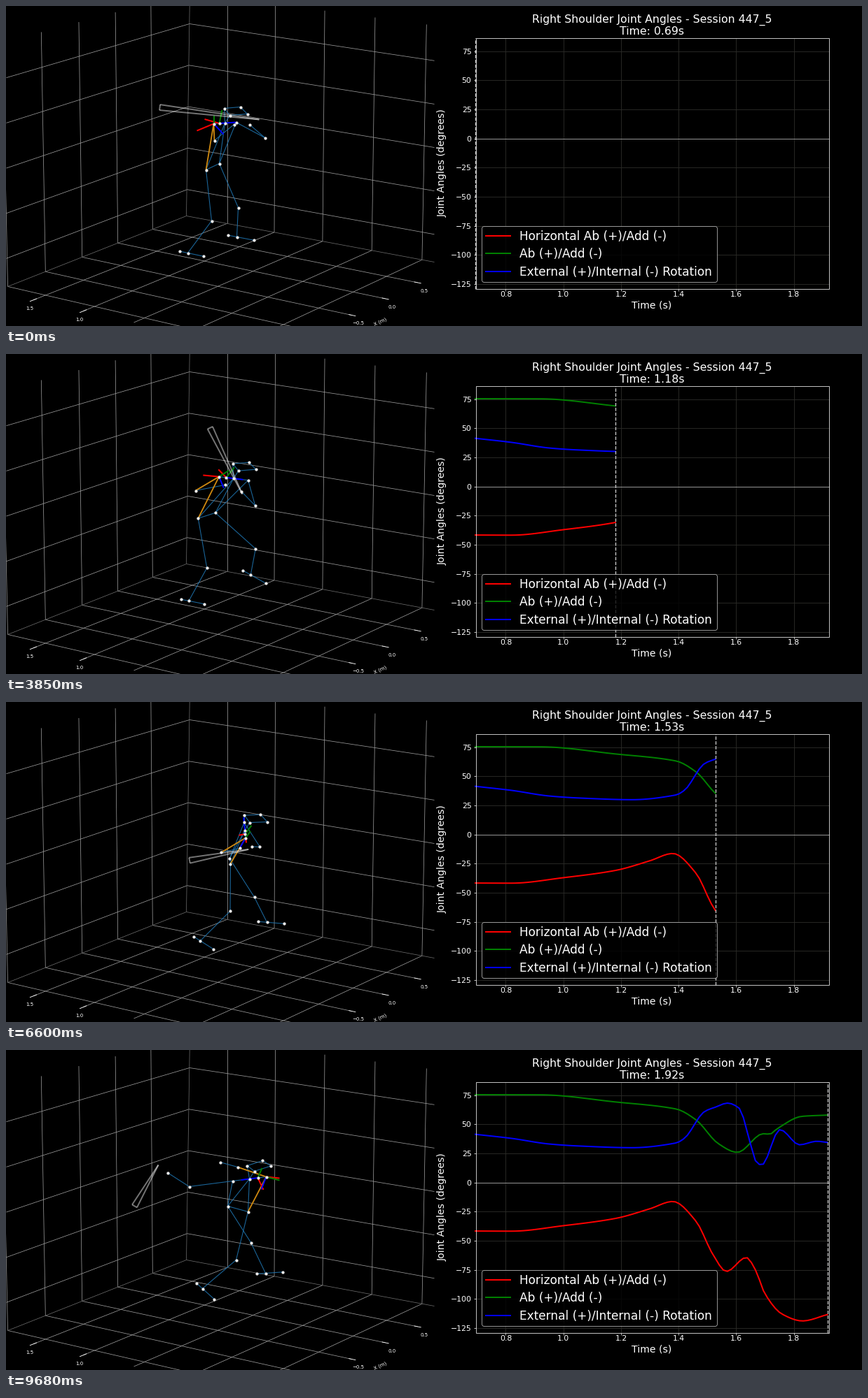
A matplotlib script that plays this animation: 1222x458 px, repeating every 9790 ms.

```python
import numpy as np
import matplotlib.pyplot as plt
from matplotlib.animation import FuncAnimation
from matplotlib.collections import LineCollection
from matplotlib.patches import FancyBboxPatch, Rectangle

W, H, DPI = 1222, 458, 64
PT = 72 / DPI  # points per pixel
FRAMES, STEP = 89, 110
frames = np.arange(FRAMES)
plt.rcParams["font.family"] = "DejaVu Sans"

fig = plt.figure(figsize=(W / DPI, H / DPI), dpi=DPI, facecolor="black")
ax = fig.add_axes([0, 0, 1, 1])
ax.set_xlim(-0.5, W - 0.5)  # whole coordinates sit on pixel centres
ax.set_ylim(H - 0.5, -0.5)
ax.axis("off")


def pchip(t, y, q):
    """Monotone cubic interpolation of y(t) at q."""
    t, y = np.asarray(t, float), np.asarray(y, float)
    h = np.diff(t)
    d = np.diff(y) / h
    m = np.r_[d[0], np.zeros(len(t) - 2), d[-1]]
    for i in range(1, len(t) - 1):
        if d[i - 1] * d[i] > 0:
            m[i] = 2 * d[i - 1] * d[i] / (d[i - 1] + d[i])
    i = np.clip(np.searchsorted(t, q, "right") - 1, 0, len(h) - 1)
    s = (q - t[i]) / h[i]
    return (y[i] * (1 + 2 * s) * (1 - s) ** 2 + h[i] * m[i] * s * (1 - s) ** 2
            + y[i + 1] * s * s * (3 - 2 * s) + h[i] * m[i + 1] * s * s * (s - 1))


def text(x, y, s, size, **kw):
    kw = {"ha": "center", "va": "center", "color": "white", **kw}
    return ax.text(x, y, s, fontsize=size * PT, **kw)


def segments(segs, color, lw, z, **kw):
    c = LineCollection(segs, colors=color, linewidths=lw * PT, zorder=z, **kw)
    ax.add_collection(c)
    return c


# ---- 3D room: two walls and a floor meeting at a corner --------------------
CX, CY, EDGE = 257, 300, 611
room, ticks = [], []


def upright(x, y, top_slope):
    """Wall line leaning outwards with distance from the middle."""
    top = x + 0.023 * (x - 315)
    room.append([(x, y), (top, -20 + top_slope * (top - 262))])


def floor_line(x, y, slope, edge_x, edge_y, edge_slope):
    """Floor line up to the near edge of the floor; returns its end."""
    ex = (edge_y - edge_slope * edge_x - y + slope * x) / (slope - edge_slope)
    ey = y + slope * (ex - x)
    room.append([(x, y), (ex, ey)])
    return ex, ey


def tick(x, y, slope, label, dx, dy):
    ticks.append([(x - 5, y - 5 * slope), (x + 5, y + 5 * slope)])
    text(x + dx, y + dy, label, 7)


for k in range(5):
    n = k + 1
    x = CX - 47.5 * n - 0.7 * n * n
    y = CY + 0.396 * (CX - x)
    upright(x, y, -0.268)
    slope = 0.195 + 0.00014 * (CX - x)
    end = floor_line(x, y, slope, 586, 396, -0.5)
    if k < 3:
        tick(*end, slope, f"{0.5 - 0.5 * k:.1f}".replace("-", "\u2212"), 9, 11.7)

    x = 315 + 66.8 * k + 0.7 * k * k
    y = CY + 0.1865 * (x - CX)
    upright(x, y, 0.136)
    slope = -0.396 - 0.00026 * (x - 315)
    end = floor_line(x, y, slope, 37, 420, 0.224)
    if k < 2:
        tick(*end, slope, f"{1.5 - 0.5 * k:.1f}", -5, 12.5)

    y = 25 + 59.3 * k
    f = (y - 25) / 275
    x = 261.5 - 4 * f
    room.append([(0, y + x * (0.295 + 0.101 * f)), (x, y),
                 (EDGE, y + (EDGE - x) * (0.151 + 0.0355 * f))])
segments(room, "#9c9c9c", 0.75, 1)
segments([[(262, -20), (CX, CY)], [(CX, CY), (2, 401)],
          [(CX, CY), (EDGE, 366)]], "#6c6c6c", 0.75, 1)
segments(ticks, "white", 0.9, 1)
text(534, 451, "X (m)", 7, rotation=25)

# ---- chart -----------------------------------------------------------------
L, R, T, B = 670, 1174, 45, 404


def px(t):
    return 712.9 + (np.asarray(t) - 0.8) * 411.2


def py(v):
    return 189.3 - np.asarray(v) * 1.6664


grid, marks = [], []
for t in np.arange(0.8, 1.9, 0.2):
    x = px(t)
    grid.append([(x, T), (x, B)])
    marks.append([(x, B), (x, B + 3)])
    text(x, 412, f"{t:.1f}", 10.9)
for v in range(-125, 76, 25):
    y = py(v)
    grid.append([(L, y), (R, y)])
    marks.append([(L - 3, y), (L, y)])
    text(664, y, str(v).replace("-", "\u2212"), 10.9, ha="right",
         va="center_baseline")
segments(grid, "#2b2b27", 0.9, 1)
segments([[(L, py(0)), (R, py(0))]], "#a0a0a0", 0.9, 2)
segments(marks, "white", 0.7, 6)
ax.add_patch(Rectangle((L, T), R - L, B - T, fill=False, ec="white",
                       lw=0.75 * PT, zorder=6))
text(921.5, 23.5, "Right Shoulder Joint Angles - Session 447_5", 15.7,
     va="baseline")
clock = text(921.5, 40.7, "", 15.7, va="baseline")
text(921.5, 428, "Time (s)", 14)
text(622, 224.5, "Joint Angles (degrees)", 14, rotation=90)

ax.add_patch(FancyBboxPatch((682.5, 318.5), 329, 73, fc="black", ec="#cccccc",
                            boxstyle="round,pad=3.5,rounding_size=3.5",
                            alpha=0.8, lw=0.9 * PT, zorder=7))

# angles in degrees at their turning points in time
curves = [
    ("Horizontal Ab (+)/Add (-)", "red",
     [(.694, -41.6), (.82, -41.7), (1, -37), (1.18, -30.8), (1.3, -22.5),
      (1.38, -16.2), (1.46, -33), (1.52, -62), (1.566, -76.3), (1.635, -64.3),
      (1.667, -75), (1.7, -95.5), (1.76, -113), (1.83, -118.8),
      (1.917, -113.3)]),
    ("Ab (+)/Add (-)", "green",
     [(.694, 75.5), (.92, 75.4), (1.18, 69.3), (1.39, 63.3), (1.46, 54),
      (1.538, 33.5), (1.604, 26), (1.694, 42), (1.716, 41.6), (1.743, 46.4),
      (1.828, 56.9), (1.917, 58)]),
    ("External (+)/Internal (-) Rotation", "blue",
     [(.694, 41.5), (.82, 38), (.95, 33.2), (1.05, 31.5), (1.24, 30),
      (1.39, 34), (1.42, 38), (1.49, 61), (1.53, 65), (1.57, 68.3),
      (1.61, 64), (1.65, 33), (1.667, 18.8), (1.688, 15), (1.752, 45.5),
      (1.82, 32.5), (1.88, 35.5), (1.917, 34.5)]),
]
times = (50 + frames) / 72
xs = px(times)
lines = []
for k, (label, color, pts) in enumerate(curves):
    y = 328.3 + 25.4 * k
    ax.plot([684.5, 719.5], [y, y], color=color, lw=2 * PT, zorder=8)
    text(732.5, y + 6, label, 17.05, ha="left", va="baseline", zorder=8)
    line, = ax.plot([], [], color=color, lw=2 * PT, zorder=4)
    lines.append((line, py(pchip(*zip(*pts), times))))
cursor, = ax.plot([], [], "--", color="#cccccc", lw=1.3 * PT, zorder=5)

# ---- batter: screen points as complex numbers x + yj -------------------------
BODY = [0, 26, 50, 70, 88]      # stance, load, stride, follow-through, finish
ARMS = [0, 26, 50, 63, 70, 88]  # the same with contact


def path(*pts):
    z = np.array(pts, complex)
    keys = BODY if len(pts) == len(BODY) else ARMS
    return pchip(keys, z.real, frames) + 1j * pchip(keys, z.imag, frames)


def turn(*degrees):
    return np.exp(1j * np.radians(path(*degrees).real))


J = {}
# head and shoulders hang on the neck
neck = J["neck"] = path(312+167j, 318+176j, 337+180j, 343+185j, 347+184j)
half = path(-16+1j, -19-2j, -23-3j, 25+10j, 24-3j)
half = half + 8j * np.exp(-((frames - 61) / 4) ** 2)
J["r_sho"], J["l_sho"], J["chest"] = neck + half, neck - half, neck + half / 2
nod = turn(0, 0, 0, 5, -13)
for i, offset in enumerate([-8-10j, 15-12j, 25-2j, 0]):
    J[f"h{i}"] = neck + 7 - 11j + offset * nod

J["r_elb"] = path(297+192j, 276+195j, 264+195j, 325+218j, 375+198j, 330+167j)
J["r_wri"] = path(325+169j, 318+186j, 305+188j, 345+212j, 375+181j, 305+160j)
J["l_elb"] = path(369+188j, 353+217j, 361+214j, 362+203j, 322+173j, 261+195j)
J["l_wri"] = path(347+169j, 340+196j, 330+197j, 355+208j, 357+168j, 230+175j)

pelvis = path(294.5+229.5j, 280+230.5j, 306.5+231j, 328+223.5j, 330.5+227j)
hip = path(-9.5+4.5j, -12+4j, -12.5+4j, 14+3.5j, 14.5+4j)
J["r_hip"], J["l_hip"] = pelvis + hip, pelvis - hip
J["r_kne"] = path(293+307j, 285+306j, 293+305j, 343+293j, 328+300j)
J["l_kne"] = path(331+288j, 348+277j, 365+281j, 343+276j, 349+275j)
J["r_ank"] = path(259+353j, 260+353j, 262+352j, 291+331j, 280+341j)
J["l_ank"] = path(329+330j, 335+319j, 374+312j, 370+318j, 370+319j)
for side, size, foot in [("r", 22.5, turn(12, 12, 10, 55, 42)),
                         ("l", 25, turn(11, 33, 16, -3, -4))]:
    J[side + "_toe"] = J[side + "_ank"] + size * foot
    J[side + "_hee"] = J[side + "_ank"] - size / 2 * foot
joints = list(J)

# axes of the chest (c) and of the upper arm (a)
J["cx"] = J["chest"] + path(-21-6j, -14-11j, -8-12j, -10+16j, 8+17j)
J["cy"] = J["chest"] + path(4-19j, 12-16j, 10-13j, 8-12j, 6-14j)
J["cz"] = J["chest"] - 24 * half / abs(half)
J["ax"] = J["r_sho"] + path(-24+10j, -25-1j, -13-3j, 14+17j, 19+2j)
J["ay"] = J["r_sho"] + path(-12j, 9-10j, 20-7j, -6-12j, 19+5j)
J["az"] = J["r_sho"] + path(14+15j, 6+16j, 8+16j, -23+11j, -7+18j)

# the bat turns about its knob
aim = turn(187, 237, 250, 130, -25, -240)
J["knob"] = path(361+162j, 346+200j, 325+200j, 350+212j, 352+182j, 217+164j)
tip = J["knob"] + path(143, 114, 93, 85, 108, 68) * aim
J["tip_a"], J["tip_b"] = tip - 4j * aim, tip + 4j * aim


def chains(s):
    """'a-b-c d-e' -> links a-b, b-c, d-e"""
    parts = [c.split("-") for c in s.split()]
    return [link for c in parts for link in zip(c, c[1:])]


layers = [(chains(s), segments([], color, lw, z, alpha=alpha))
          for s, color, lw, z, alpha in [
    ("neck-h0-h1-h2-h3-h0 h3-neck-chest-r_sho neck-l_sho-l_elb-l_wri "
     "r_elb-r_wri neck-r_hip-l_hip-neck l_sho-l_hip "
     "r_hip-r_kne-r_ank-r_hee r_ank-r_toe l_hip-l_kne-l_ank-l_hee l_ank-l_toe",
     "#1f77b4", 1.1, 2, 0.85),
    ("r_elb-r_sho-r_hip", "#d08a10", 1.8, 3, 1),
    ("chest-cx r_sho-ax", "red", 2, 4, 1),
    ("chest-cy r_sho-ay", "green", 2, 4, 1),
    ("chest-cz r_sho-az", "blue", 2, 4, 1),
    ("tip_b-knob-tip_a-tip_b", "white", 2, 5, 0.45),
]]
dots, = ax.plot([], [], "o", color="#ececec", ms=4.3 * PT, mew=0, zorder=6)


def xy(name, k):
    return J[name][k].real, J[name][k].imag


def update(k):
    for links, coll in layers:
        coll.set_segments([[xy(a, k), xy(b, k)] for a, b in links])
    dots.set_data(*zip(*(xy(j, k) for j in joints)))
    for line, ys in lines:
        line.set_data(xs[:k + 1], ys[:k + 1])
    cursor.set_data([xs[k]] * 2, [B, T])
    clock.set_text(f"Time: {times[k]:.2f}s")
    return []


anim = FuncAnimation(fig, update, frames=FRAMES, interval=STEP, repeat=True,
                     repeat_delay=0)
plt.show()
```
